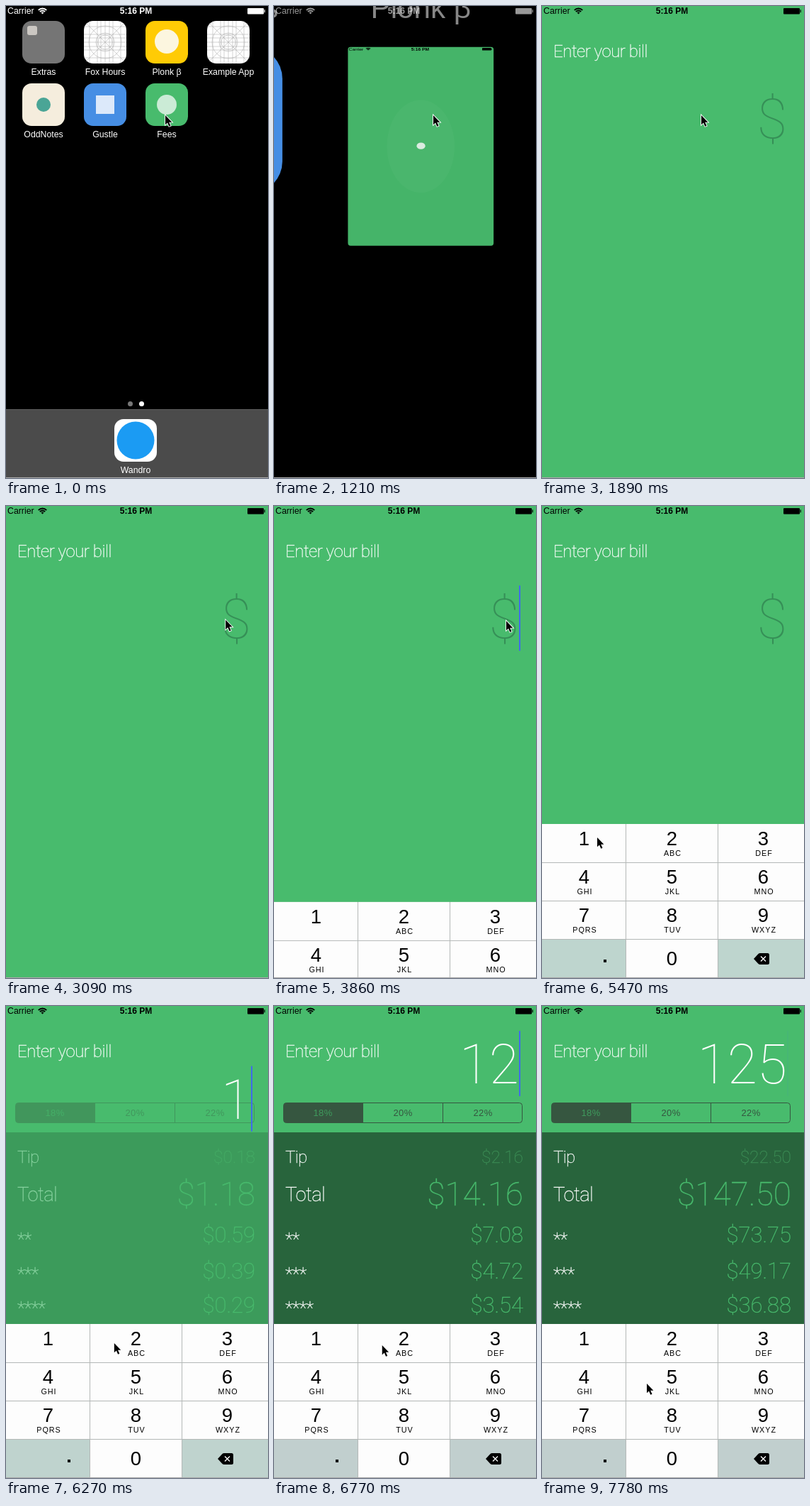
Animation of 370 by 665 pixels, one loop 8 s. Source, as an HTML page:

```html
<!DOCTYPE html>
<html lang="en">
<head>
<meta charset="utf-8">
<title>Bill splitter</title>
<style>
  html, body { margin: 0; width: 100%; height: 100%; overflow: hidden; background: #000; }
  svg { display: block; width: 100%; height: 100%; }
  text { font-family: "Liberation Sans", Arial, sans-serif; font-size: 12.3px; }
  .mid { text-anchor: middle; }
  .end { text-anchor: end; }
  .thin {
    font-family: Roboto, Inter, sans-serif; font-weight: 100;
    fill: currentColor; stroke: currentColor; stroke-width: .35px;
  }
  .clock { font-size: 12px; font-weight: bold; }
  .digit { font-size: 27.5px; }
  .abc { font-size: 10.8px; letter-spacing: 1px; }
  .seg { font-size: 13px; letter-spacing: .4px; }
  .bill { font-size: 77px; stroke: none; }
</style>
</head>
<body>
<svg id="stage" viewBox="0 0 370 665" preserveAspectRatio="none"></svg>
<script>
const LOOP = 8000, GREEN = '#48bb6d';
const stage = document.getElementById('stage');

// ---- markup helpers ----
const text = (x, y, str, cls = '', more = '') =>
  `<text x="${x}" y="${y}" class="${cls}" ${more}>${str}</text>`;
const rect = (x, y, w, h, fill, more = '') =>
  `<rect x="${x}" y="${y}" width="${w}" height="${h}" fill="${fill}" ${more}/>`;
const circle = (x, y, r, fill, more = '') =>
  `<circle cx="${x}" cy="${y}" r="${r}" fill="${fill}" ${more}/>`;
const tile = (x, y, fill) => rect(x, y, 60, 60, fill, 'rx="13"');

function statusBar(color) {
  const arc = r => {
    const d = r * .72, y = 11.5 - r * .7;
    return `<path d="M${51.5 - d} ${y}A${r} ${r} 0 0 1 ${51.5 + d} ${y}" fill="none" stroke="${color}" stroke-width="1.9"/>`;
  };
  return `<g fill="${color}">` + text(2, 11.3, 'Carrier') + text(183.5, 11.3, '5:16 PM', 'mid clock') +
    arc(8) + arc(5) + `<path d="M51.5 11.5l-2 -2.2a3 3 0 0 1 4 0z"/>` +
    rect(341, 3, 23, 8.5, color, 'rx="1"') + rect(364.6, 5.2, 1.2, 4, color) + '</g>';
}

function blankIcon(x, y) {
  let d = '';
  for (const k of [8, 19, 24, 30, 36, 41, 52]) d += `M${k} 0V60M0 ${k}H60`;
  d += 'M3 3L57 57M57 3L3 57';
  const rings = [10, 13, 23].map(r => circle(30, 30, r, 'none')).join('');
  return tile(x, y, '#fff') +
    `<g transform="translate(${x} ${y})" fill="none" stroke="#a4a4a4" stroke-width=".5"><path d="${d}"/>${rings}</g>`;
}

// ---- home screen ----
const col = [23, 110, 197, 284];
const icons =
  tile(col[0], 21, '#757575') + rect(30, 28, 14, 13, '#cbc7c2', 'rx="3"') +
  blankIcon(col[1], 21) +
  tile(col[2], 21, '#ffcb05') + circle(227, 50, 17, '#fcf6df') +
  blankIcon(col[3], 21) +
  tile(col[0], 109, '#f5eddd') + circle(53, 139, 10, '#4aa596') +
  tile(col[1], 109, '#468ee4') + rect(127, 126, 26, 26, '#dce9fa');
const names = [['Extras', 'Fox Hours', 'Plonk β', 'Example App'], ['OddNotes', 'Gustle', 'Fees']];
const labels = names.map((row, r) =>
  row.map((n, i) => text(col[i] + 30, 97 + 88 * r, n, 'mid')).join('')).join('');
const dock =
  circle(175.5, 560.5, 3.5, '#777') + circle(191.5, 560.5, 3.5, '#fff') +
  rect(0, 568, 370, 97, '#4b4b4b') + rect(0, 568, 370, 1, '#5c5c5c') +
  tile(153, 582, '#fff') + circle(183, 612, 26.5, '#1b9bf3');

// ---- keypad ----
const keyX = [0, 119, 249, 370], keyMid = [59.5, 183.5, 312.5];
const letters = ['', 'ABC', 'DEF', 'GHI', 'JKL', 'MNO', 'PQRS', 'TUV', 'WXYZ'];
function keypad() {
  let s = rect(0, 0, 370, 217, '#b4b8b7');
  for (let i = 0; i < 12; i++) {
    const c = i % 3, y = 54 * Math.floor(i / 3);
    const side = i === 9 || i === 11;
    s += rect(keyX[c], y + (y ? 1 : 0), keyX[c + 1] - keyX[c] - (c < 2 ? 1 : 0), y ? 53 : 54, '#fdfdfd',
      side ? 'class="side"' : `id="key${i === 10 ? 0 : i + 1}"`);
    if (side) continue;
    s += text(keyMid[c], y + (i === 10 ? 37 : 30), i === 10 ? 0 : i + 1, 'mid digit');
    if (letters[i]) s += text(keyMid[c] + 1, y + 45, letters[i], 'mid abc');
  }
  return s + rect(87, 191, 4, 4, '#000') +
    `<path d="M299 190l6.500-7q1-1 2.500-1h10.500q2.500 0 2.500 2.500v11q0 2.500-2.500 2.500h-10.500q-1.500 0-2.500-1z"/>
     <path d="M309 186.500l7 7m0-7l-7 7" stroke="#fff" stroke-width="1.300"/>`;
}

// ---- bill form ----
const DARK = '#365640';
const segments =
  rect(13.5, 136.5, 337, 28, 'none', `rx="4" stroke="${DARK}"`) +
  `<path d="M126 136.500H17.500a4 4 0 0 0-4 4v20a4 4 0 0 0 4 4H126z" fill="${DARK}"/>` +
  rect(238, 136, 1, 29, DARK) +
  text(69, 155, '18%', 'mid seg', 'fill="#3f9a5c"') +
  ['20%', '22%'].map((s, i) => text(182 + 113 * i, 155, s, 'mid seg', `fill="${DARK}"`)).join('');
// label, label baseline, label size, amount baseline, amount size, amount colour
const rows = [
  ['Tip', 221, 24, 221, 24.5, '#3b8b54'],
  ['Total', 275, 27.5, 281, 46, GREEN],
  ['**', 338, 25, 333, 31, GREEN],
  ['***', 387, 25, 384, 31, GREEN],
  ['****', 434.5, 25, 432, 31, GREEN]
];
const panel = rect(0, 178, 370, 271, '#28643c') + rows.map(([name, y, size, ay, as, color]) =>
  text(16, y, name, 'thin', `color="#fff" style="font-size:${size}px;letter-spacing:-.6px"`) +
  text(352, ay, '', 'thin end amount', `color="${color}" style="font-size:${as}px"`)).join('');

stage.innerHTML =
  rect(0, 0, 370, 665, '#000') +
  `<g id="home">${icons}${dock}<g id="labels" fill="#fff">${labels}${text(183, 658, 'Wandro', 'mid')}</g></g>
   <g id="homeBar">${statusBar('#fff')}</g>
   <g id="app">
     ${rect(0, 0, 370, 665, GREEN, 'id="face"')}
     <ellipse id="iconMark" cx="185" cy="332.5" rx="86" ry="155" fill="#d9f1e1"/>
     <g id="appBar">${statusBar('#000')}</g>
     ${circle(185.5, 331, 11, '#fff', 'id="mark"')}
     <g id="form">
       ${text(16, 72, 'Enter your bill', 'thin', 'color="#fff" style="font-size:24px;letter-spacing:-.45px"')}
       <g id="result">${segments}${panel}</g>
       <g id="field">
         ${text(346, 74, '$', 'thin end bill', 'id="hint" color="#368f57"')}
         ${text(346, 74, '', 'thin end bill', 'id="value" color="#fff"')}
         ${rect(346, 0, 2, 92, '#3f6bea', 'id="caret"')}
       </g>
     </g>
     ${rect(0, 0, 370, 665, '#000', 'id="shade"')}
   </g>
   <g id="keys">${keypad()}</g>
   ${rect(0, 664, 370, 1, '#a9a9a9')}
   <path id="pointer" d="M0 0V13.300l3-2.800 2.300 5.200 2.200-.9-2.300-5.100h4.200z" stroke="#fff" stroke-width="1.800" paint-order="stroke"/>`;

const el = id => document.getElementById(id);
const set = (id, attrs) => { for (const k in attrs) el(id).setAttribute(k, attrs[k]); };
const fade = (id, v) => set(id, { opacity: v });
const amounts = [...document.querySelectorAll('.amount')];
const sides = [...document.querySelectorAll('.side')];

// ---- timing ----
const span = (t, a, b) => Math.min(1, Math.max(0, (t - a) / (b - a)));
const ease = (t, a, b) => { const u = span(t, a, b); return u * u * (3 - 2 * u); };
const mix = (a, b, u) => a + (b - a) * u;

function track(points, t) {
  let v = points[0][1];
  for (let i = 1; i < points.length; i++)
    if (t >= points[i - 1][0]) v = mix(points[i - 1][1], points[i][1], span(t, points[i - 1][0], points[i][0]));
  return v;
}

const caretTrack = [[3740, 0], [3750, 1], [4250, 1], [4480, 0], [4780, 0], [4860, 1], [5260, 1],
  [5470, 0], [5770, 0], [5830, 1], [7650, 1], [7780, .06]];
const shadeTrack = [[780, 0], [800, .4], [940, .4], [1060, .05], [1570, 0]];
const moves = [[2760, 3210, 328, 162], [4780, 5460, 78, 467], [5960, 6280, 153, 475], [6740, 6960, 148, 532]];
const presses = [[1, 5780, 6020], [2, 6620, 6730], [5, 6980, 7170]];
const typed = [[6020, '1'], [6680, '12'], [7080, '125']];

function showBill(t) {
  let str = '';
  for (const [at, s] of typed) if (t >= at) str = s;
  el('value').textContent = str;
  fade('hint', str ? 0 : 1);
  const bill = Number(str), total = bill * 1.18;
  [bill * .18, total, total / 2, total / 3, total / 4]
    .forEach((v, i) => { amounts[i].textContent = '$' + v.toFixed(2); });
}

function draw(t) {
  // launch zoom out of the icon
  const p = ease(t, 923, 1523);
  const x = 197 * (1 - p), y = 109 * (1 - p);
  const w = 60 + 310 * p, h = 60 + 605 * p ** 1.34;
  const sx = w / 370, sy = h / 665, r = 13 * (1 - p) ** 2;
  const corner = { rx: r / sx, ry: r / sy };
  set('home', { transform: `translate(${x} ${y}) scale(${w / 60}) translate(-197 -109)` });
  set('app', { transform: `translate(${x} ${y}) scale(${sx} ${sy})` });
  set('face', corner);
  set('shade', corner);
  fade('shade', track(shadeTrack, t));
  fade('labels', 1 - p);
  fade('homeBar', 1 - .85 * p);
  fade('appBar', span(p, .02, .4));
  fade('iconMark', .9 * (1 - span(p, 0, .49)));

  const shown = span(t, 1720, 1890);
  fade('mark', .85 * span(p, .05, .45) * (1 - shown));
  fade('form', shown);

  // keypad springs in
  const k = Math.max(0, t - 3740) * .0137;
  set('keys', { transform: `translate(0 ${448 + 217 * (1 + k) * Math.exp(-k)})` });
  for (const [key, a, b] of presses) set('key' + key, { fill: t >= a && t < b ? '#bfd0cb' : '#fdfdfd' });

  // result panel
  const q = ease(t, 6090, 6540);
  fade('result', q);
  set('field', { transform: `translate(0 ${112 - 77 * q})` });
  const side = `rgb(${mix(190, 193, q)},${mix(213, 207, q)},206)`;
  sides.forEach(s => s.setAttribute('fill', side));
  fade('caret', track(caretTrack, t));
  showBill(t);

  let px = 225, py = 154;
  for (const [a, b, tx, ty] of moves) {
    const u = ease(t, a, b);
    px = mix(px, tx, u);
    py = mix(py, ty, u);
  }
  set('pointer', { transform: `translate(${px} ${py})` });
}

const start = performance.now();
function tick(now) {
  draw(Math.max(0, now - start) % LOOP);
  requestAnimationFrame(tick);
}
draw(0);
requestAnimationFrame(tick);
</script>
</body>
</html>
```
